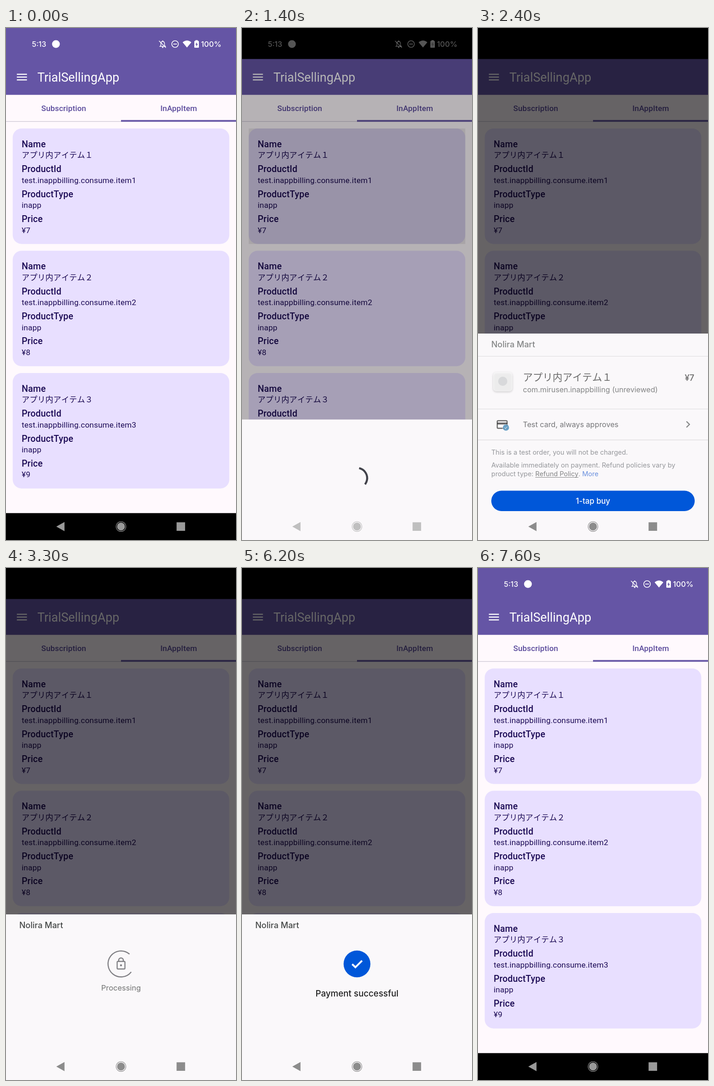
Animation of 502x1116 px, one loop 7650 ms. Source, as an HTML page with a canvas:

```html
<!DOCTYPE html>
<html lang="ja">
<head>
<meta charset="utf-8">
<title>Purchase flow</title>
<style>
html, body { margin: 0; width: 100%; height: 100%; overflow: hidden; background: #000; }
canvas { display: block; width: 502px; height: 1116px; }
</style>
</head>
<body>
<canvas id="stage" width="502" height="1116"></canvas>
<script>
const W = 502, H = 1116, LOOP = 7650, STEP = 50, CX = 251;
const STATUS_H = 67.6, HEADER_H = 145.7, TABS_END = 204.3, NAV_TOP = 1057.4, NAV_Y = 1086.7;
const CARD = { x: 14.65, y: 219, w: 472.7, h: 251.8, pitch: 266.45 };
const ctx = document.getElementById('stage').getContext('2d');
const APP_FONT = 'Roboto, "Noto Sans CJK JP", "Noto Sans CJK", sans-serif';
const SHEET_FONT = 'Inter, "Noto Sans CJK JP", "Noto Sans CJK", sans-serif';
const PURPLE = '#6555a5', INK = '#1b0a54', SHEET = '#faf8fa', BLUE = '#0057d9';
const OPEN = 1250, CLOSE = 7400;

const ramp = (t, a, b) => Math.min(1, Math.max(0, (t - a) / (b - a)));
const easeOut = p => 1 - (1 - p) ** 3;
const easeInOut = p => p * p * (3 - 2 * p);
const mix = (a, b, p) => a + (b - a) * p;
const rad = deg => deg * Math.PI / 180;

function text(str, x, y, size, color, { weight = 400, font = APP_FONT, align = 'left', spacing = 0 } = {}) {
  ctx.font = `${weight} ${size}px ${font}`;
  ctx.letterSpacing = spacing + 'px';
  ctx.textAlign = align;
  ctx.fillStyle = color;
  ctx.fillText(str, x, y);
  return ctx.measureText(str).width;
}
const sheetText = (str, x, y, size, color, opts = {}) =>
  text(str, x, y, size, color, { font: SHEET_FONT, ...opts });

function rect(x, y, w, h, color) {
  ctx.fillStyle = color;
  ctx.fillRect(x, y, w, h);
}
function roundRect(x, y, w, h, r) {
  ctx.beginPath();
  ctx.roundRect(x, y, w, h, r);
}
function disc(x, y, r, color) {
  ctx.beginPath();
  ctx.arc(x, y, r, 0, 2 * Math.PI);
  ctx.fillStyle = color;
  ctx.fill();
}
function arc(x, y, r, from, sweep, width, color) {
  ctx.beginPath();
  ctx.arc(x, y, r, rad(from), rad(from + sweep));
  ctx.lineWidth = width;
  ctx.strokeStyle = color;
  ctx.stroke();
}
function line(points, width, color) {
  ctx.beginPath();
  points.forEach(([x, y]) => ctx.lineTo(x, y));
  ctx.lineWidth = width;
  ctx.strokeStyle = color;
  ctx.stroke();
}
function polygon(points, color) {
  ctx.beginPath();
  points.forEach(([x, y]) => ctx.lineTo(x, y));
  ctx.fillStyle = color;
  ctx.fill();
}
function layer(alpha, draw) {
  if (alpha <= 0) return;
  ctx.save();
  ctx.globalAlpha *= alpha;
  draw();
  ctx.restore();
}

function drawStatusIcons(back) {
  const white = '#fff';
  sheetText('5:13', 56.5, 41, 16, white, { weight: 500 });
  disc(109, 35, 8.5, white);
  // muted bell
  ctx.beginPath();
  ctx.moveTo(336, 40);
  ctx.lineTo(338, 38);
  ctx.lineTo(338, 34);
  ctx.bezierCurveTo(338, 28, 346, 28, 346, 34);
  ctx.lineTo(346, 38);
  ctx.lineTo(348, 40);
  ctx.closePath();
  ctx.lineWidth = 1.4;
  ctx.strokeStyle = white;
  ctx.stroke();
  disc(342, 42, 1.6, white);
  disc(342, 28.5, 1.3, white);
  line([[334, 28], [349, 43]], 1.5, white);
  // do not disturb
  arc(369, 35, 7.2, 0, 360, 1.6, white);
  line([[365, 35], [373, 35]], 1.7, white);
  // wifi
  ctx.beginPath();
  ctx.moveTo(395, 42.5);
  ctx.lineTo(385.5, 31.2);
  ctx.quadraticCurveTo(395, 23.5, 404.5, 31.2);
  ctx.closePath();
  ctx.fillStyle = white;
  ctx.fill();
  // battery
  roundRect(411, 28, 10, 15, 1.5);
  ctx.fillStyle = white;
  ctx.fill();
  rect(413.5, 26.5, 5, 2, white);
  polygon([[416.7, 31], [413.3, 36.3], [415.5, 36.3], [415.3, 40.5], [418.8, 34.8], [416.6, 34.8]], back);
  sheetText('100%', 425.5, 41, 16.5, white, { weight: 500 });
}

function drawCard(index) {
  const y = CARD.y + index * CARD.pitch;
  const fields = [
    ['Name', 'アプリ内アイテム' + '１２３'[index]],
    ['ProductId', `test.inappbilling.consume.item${index + 1}`],
    ['ProductType', 'inapp'],
    ['Price', '¥' + (index + 7)]
  ];
  roundRect(CARD.x, y, CARD.w, CARD.h, 19.5);
  ctx.fillStyle = '#e8dfff';
  ctx.fill();
  fields.forEach(([label, value], i) => {
    const base = y + 40.8 + i * 54.4;
    text(label, 34.2, base, 19.5, INK, { weight: 500, spacing: .18 });
    text(value, 34.2, base + 23.5, 17.1, INK, { spacing: .2 });
  });
}

function drawCardRipple(t) {
  layer(.1 * (1 - ramp(t, 1350, 1600)), () => {
    ctx.beginPath();
    ctx.rect(CARD.x, CARD.y, CARD.w, CARD.h);
    ctx.clip();
    disc(CX, 345, 280 * ramp(t, 1080, 1280), '#000');
  });
}

function drawApp(t) {
  rect(0, 0, W, H, '#fff9fd');
  rect(0, 0, W, HEADER_H, PURPLE);
  [-6.1, 0, 6.1].forEach(dy => line([[23.7, 107 + dy], [45.7, 107 + dy]], 2.4, '#fff'));
  text('TrialSellingApp', 68.5, 117, 26.8, '#fff');
  const tab = { weight: 500, align: 'center', spacing: .12 };
  text('Subscription', 126, 181.4, 17.1, '#5b4b9c', tab);
  text('InAppItem', 377, 181.4, 17.1, '#5b4b9c', tab);
  rect(0, TABS_END - 1.2, W, 1.2, '#c9c3d0');
  rect(CX, TABS_END - 3.7, W - CX, 3.7, PURPLE);
  for (let i = 0; i < 3; i++) drawCard(i);
  if (t >= 1100 && t < 1600) drawCardRipple(t);
}

function drawNav(t) {
  const light = t >= OPEN && t < CLOSE;
  const shade = light ? Math.round(mix(255, 140, ramp(t, 1300, 1480))) : 153;
  const color = `rgb(${shade},${shade},${shade})`;
  rect(0, NAV_TOP, W, H - NAV_TOP, light ? SHEET : '#000');
  ctx.save();
  if (light && shade > 200) {
    ctx.shadowColor = 'rgba(0,0,0,.25)';
    ctx.shadowBlur = 2;
  }
  polygon([[109.8, NAV_Y], [127.7, NAV_Y - 10], [127.7, NAV_Y + 10]], color);
  disc(CX, NAV_Y, 8.6, color);
  arc(CX, NAV_Y, 10.7, 0, 360, 1.1, color);
  rect(372.3, NAV_Y - 9.3, 18.6, 18.6, color);
  ctx.restore();
}

function drawOffer() {
  const soft = '#444746', small = '#5f6368', smallSize = 14.5;
  ctx.save();
  ctx.shadowColor = 'rgba(0,0,0,.28)';
  ctx.shadowBlur = 4;
  ctx.shadowOffsetY = 1.5;
  roundRect(33, 750, 42, 42, 7);
  ctx.fillStyle = '#fdfdfd';
  ctx.fill();
  ctx.restore();
  disc(54, 770, 10, '#ced0d2');

  sheetText('アプリ内アイテム１', 98, 769, 21.6, '#1f1f1f');
  sheetText('com.mirusen.inappbilling (unreviewed)', 98, 793.8, 16.1, soft);
  sheetText('¥7', 472, 769, 18.5, '#1f1f1f', { weight: 500, align: 'right' });

  roundRect(42, 856, 21.5, 16.5, 2);
  ctx.lineWidth = 2.4;
  ctx.strokeStyle = '#1f1f1f';
  ctx.stroke();
  rect(42, 860, 21.5, 4.2, '#1f1f1f');
  disc(61, 871, 7.6, SHEET);
  disc(61, 871, 6.8, '#1d73ac');
  line([[57.8, 871], [60.1, 873.4], [64.2, 868.8]], 1.5, '#fff');

  sheetText('Test card, always approves', 98, 870, 16.2, '#303134');
  line([[455, 857.5], [461.5, 864], [455, 870.5]], 2.3, soft);

  sheetText('This is a test order, you will not be charged.', 29, 930.3, smallSize, small);
  sheetText('Available immediately on payment. Refund policies vary by', 29, 958.3, smallSize, small);
  let x = 29;
  const run = (str, color) => { x += sheetText(str, x, 976.8, smallSize, color); };
  run('product type: ', small);
  const start = x;
  run('Refund Policy', soft);
  rect(start, 979, x - start, 1, soft);
  run('. ', small);
  run('More', '#1b57d0');
}

function drawOfferFrame() {
  [715.5, 830.5, 897.8].forEach(y => line([[0, y], [W, y]], 1.2, '#dcdbdd'));
}

function drawBuyButton(t) {
  roundRect(29, 1008.5, 444, 44.5, 22.2);
  ctx.fillStyle = BLUE;
  ctx.fill();
  layer(t >= 2850 ? .18 * (1 - ramp(t, 3000, 3150)) : 0, () => {
    ctx.clip();
    disc(CX, 1031, 240 * easeOut(ramp(t, 2820, 3020)), '#fff');
  });
  sheetText('1-tap buy', CX, 1036.7, 16.8, '#fff', { weight: 500, align: 'center' });
}

function drawProcessing(t) {
  const color = '#58595e';
  arc(CX, 863, 28.3, -88 + (t - 3950) * .36, 273, 2.4, color);
  roundRect(242.6, 857.5, 17, 16.5, 1.8);
  ctx.lineWidth = 2.4;
  ctx.strokeStyle = color;
  ctx.stroke();
  ctx.beginPath();
  ctx.moveTo(246, 857);
  ctx.lineTo(246, 855);
  ctx.arc(CX, 855, 5, Math.PI, 0);
  ctx.lineTo(256, 857);
  ctx.stroke();
  disc(CX, 866, 2.2, color);
}

function drawSuccess(t) {
  disc(CX, 863, 29.3 * easeOut(ramp(t, 4800, 5000)), BLUE);
  const p = ramp(t, 4900, 5100);
  if (p > 0) {
    const first = Math.min(1, p * 3), rest = ramp(p, 1 / 3, 1);
    line([[240.5, 863.5], [mix(240.5, 247.5, first), mix(863.5, 870.3, first)],
      [mix(247.5, 262, rest), mix(870.3, 855.8, rest)]].slice(0, rest > 0 ? 3 : 2), 4, '#fff');
  }
  layer(ramp(t, 4900, 5150), () =>
    sheetText('Payment successful', CX, 933.5, 18.8, '#1f1f1f', { weight: 500, align: 'center' }));
}

function sheetTop(t) {
  if (t < 2150) return mix(NAV_TOP, 824, easeOut(ramp(t, 1300, 1500)));
  if (t < 2900) return mix(824, 666, easeOut(ramp(t, 2150, 2400)));
  if (t < 7100) return mix(666, 755, easeInOut(ramp(t, 3050, 3300)));
  return mix(755, H, ramp(t, 7100, 7400) ** 1.6);
}

function drawSheet(t) {
  const top = sheetTop(t);
  ctx.save();
  ctx.beginPath();
  ctx.rect(0, top, W, H - top);
  ctx.clip();
  rect(0, top, W, H - top, SHEET);

  layer(1 - ramp(t, 2150, 2300), () => {
    const phase = (t - 1500) / 1333 * 2 * Math.PI;
    arc(CX, 952 + top - sheetTop(1500), 22.2, -38 + (t - 1500) * .4, 161 + 100 * Math.sin(phase), 4.4, '#42434b');
  });

  const reveal = ramp(t, 2250, 2480), leave = 1 - ramp(t, 2980, 3150);
  layer(reveal, () => sheetText('Nolira Mart', 29, top + 29.7, 18, '#444746', { weight: 500 }));

  ctx.save();
  ctx.translate(0, top - 666);
  layer(ramp(t, 2200, 2350) * leave, () => {
    drawOfferFrame();
    drawBuyButton(t);
  });
  layer(reveal * leave, drawOffer);
  ctx.restore();

  ctx.save();
  ctx.translate(0, top - 755);
  const busy = ramp(t, 3150, 3350);
  layer(busy * (1 - ramp(t, 4800, 4950)), () => {
    drawProcessing(t);
    sheetText('Processing', CX, 920.7, 16.5, '#444746', { align: 'center' });
  });
  if (t >= 4800) drawSuccess(t);
  ctx.restore();
  ctx.restore();
}

function draw(t) {
  const away = t >= OPEN && t < CLOSE;
  drawApp(t);
  const dim = .6 * ramp(t, 1300, 1510) * (1 - ramp(t, 7150, 7450));
  layer(dim, () => rect(0, 0, W, H, '#000'));
  if (t > 1300 && t < CLOSE) drawSheet(t);
  if (away) rect(0, 0, W, STATUS_H, '#000');
  const icons = t < CLOSE ? 1 - ramp(t, 1300, 1450) : ramp(t, 7350, 7500);
  layer(icons, () => drawStatusIcons(away ? '#000' : PURPLE));
  drawNav(t);
}

function tick() {
  const t = performance.now() % LOOP;
  draw(Math.floor(t / STEP) * STEP);
  requestAnimationFrame(tick);
}
tick();
</script>
</body>
</html>
```
